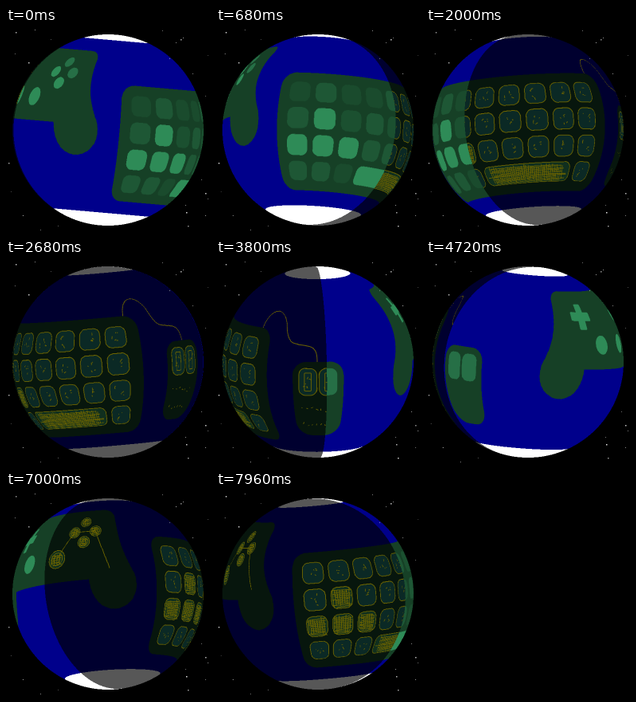
These frames come from a looping animation (256 px wide and 256 px high, 8000 ms). An HTML page with a canvas:

```html
<!DOCTYPE html>
<html>
<head>
<meta charset="utf-8">
<style>
html, body { margin: 0; width: 100%; height: 100%; overflow: hidden; background: #000; }
canvas { display: block; width: 100vw; height: 100vh; }
</style>
</head>
<body>
<canvas id="stage" width="256" height="256"></canvas>
<script>
const SIZE = 256, RADIUS = 120, LOOP = 8000;
const SCALE = 4, MAP_W = 360 * SCALE, MAP_H = 180 * SCALE;
const DEG = Math.PI / 180;
const LAND = '#164026', BRIGHT = '#2e8b57', MEDIUM = '#266f46';
const GOLD = '#6e6500', NIGHT_KEY = '#0b2925';

let seed = 7;
const random = () => (seed = (seed * 16807) % 2147483647) / 2147483647;
const between = (a, b) => a + (b - a) * random();

// Map canvases use longitude (0..360) and latitude (90..-90) as coordinates.
function makeMap() {
  const canvas = document.createElement('canvas');
  canvas.width = MAP_W;
  canvas.height = MAP_H;
  const g = canvas.getContext('2d');
  g.setTransform(SCALE, 0, 0, -SCALE, 0, MAP_H / 2);
  return g;
}
const pixels = g => new Uint32Array(g.getImageData(0, 0, MAP_W, MAP_H).data.buffer);

function box(cx, cy, w, h, r) {
  const path = new Path2D();
  path.roundRect(cx - w / 2, cy - h / 2, w, h, r);
  return path;
}
function disc(cx, cy, r) {
  const path = new Path2D();
  path.arc(cx, cy, r, 0, 2 * Math.PI);
  return path;
}

const keys = [];
for (let row = 0; row < 4; row++) {
  for (let col = 0; col < 8; col++) {
    if (row === 3 && col > 2 && col < 7) continue;
    const lit = (row === 1 && col === 1) || (row === 2 && col < 3);
    const fill = lit ? BRIGHT : ['#1a4b2d', '#1b5030', '#1e5735'][Math.floor(random() * 3)];
    keys.push({ x: 20 + 16.4 * col, y: 16 - 16.4 * row, w: 13, h: 12.8, lit, fill });
  }
}
keys.push({ x: 93.3, y: -33.2, w: 62, h: 12.8, lit: true, fill: BRIGHT });

const mouseButtons = [
  { x: 176.2, y: -2.2, w: 11, h: 16.5, fill: MEDIUM },
  { x: 188.6, y: -2.2, w: 11, h: 16.5, fill: MEDIUM }
];
const allKeys = [...keys, ...mouseButtons];

const padButtons = [
  [279, 16.7, 5.8, BRIGHT], [303.5, 16.7, 5.8, BRIGHT],
  [314, 34.3, 4, BRIGHT], [321.6, 26.6, 4, BRIGHT],
  [329.6, 34.3, 4, MEDIUM], [321.6, 42.4, 4, MEDIUM]
];

const keyboard = box(78.5, -9, 143, 76, 9);
const mouse = new Path2D();
mouse.roundRect(167, -40, 31, 50, [11, 11, 8, 8]);

const gamepad = new Path2D(
  'M252 54 H336 Q344 54 345.5 47 Q344.5 30 347 20 Q349 12 353 4 ' +
  'Q356 -8 348 -14 Q340 -19.5 332 -14 Q326 -9 325 2 H263 ' +
  'Q262 -9 256 -14 Q248 -19.5 240 -14 Q232 -8 235 4 ' +
  'Q239 12 241 20 Q243.5 30 242.5 47 Q244 54 252 54 Z');

const cross = new Path2D();
cross.roundRect(256.6, 31.9, 17, 6, 1);
cross.roundRect(262.1, 26.1, 6, 17.6, 1);

const cable = new Path2D('M141.7 29 C142 43 155 45 160 33 C163 20 166 21 173 20 S182 18 182 10');
const circuit = new Path2D('M303.5 16.7 L314 34.3 H329.6 L338 8');

function drawDay(g) {
  const fill = (path, color) => { g.fillStyle = color; g.fill(path); };
  g.fillStyle = '#00008b';
  g.fillRect(0, -90, 360, 180);
  g.fillStyle = '#fff';
  g.fillRect(0, 70, 360, 20);
  g.fillRect(0, -90, 360, 30);
  for (const shape of [keyboard, mouse, gamepad]) fill(shape, LAND);
  for (const k of allKeys) fill(box(k.x, k.y, k.w, k.h, 4), k.fill);
  for (const [x, y, r, color] of padButtons) fill(disc(x, y, r), color);
  fill(cross, BRIGHT);
}

function line(g, x1, y1, x2, y2) {
  g.beginPath();
  g.moveTo(x1, y1);
  g.lineTo(x2, y2);
  g.stroke();
}

function dash(g, x, y) {
  const angle = between(-1.5, 1.5), length = between(0.5, 1.8);
  line(g, x, y, x + length * Math.cos(angle), y + length * Math.sin(angle));
}

// Ragged crosshatching inside a box.
function scribble(g, cx, cy, w, h, gap) {
  const reach = size => size * between(0.28, 0.48);
  for (let y = -h * 0.42; y <= h * 0.42; y += gap) {
    const tilt = between(-0.4, 0.4);
    line(g, cx - reach(w), cy + y - tilt, cx + reach(w), cy + y + tilt);
  }
  for (let x = -w * 0.42; x <= w * 0.42; x += gap * 1.3) {
    const tilt = between(-0.4, 0.4);
    line(g, cx + x - tilt, cy - reach(h), cx + x + tilt, cy + reach(h));
  }
}

function drawNight(g) {
  g.save();
  g.resetTransform();
  g.drawImage(dayMap.canvas, 0, 0);
  g.fillStyle = 'rgba(0,0,0,0.66)';
  g.fillRect(0, 0, MAP_W, MAP_H);
  g.restore();
  g.strokeStyle = GOLD;
  g.fillStyle = NIGHT_KEY;
  g.lineWidth = 0.45;
  for (const path of [cable, circuit, cross]) g.stroke(path);

  for (const k of allKeys) {
    const shape = box(k.x, k.y, k.w, k.h, 4);
    if (!k.lit) g.fill(shape);
    g.stroke(shape);
    if (k.lit) scribble(g, k.x, k.y, k.w, k.h, 1.1);
    else for (let i = 0; i < 5; i++) dash(g, k.x + between(-3.5, 2.2), k.y + between(-3, 3));
  }
  for (const k of mouseButtons) g.stroke(box(k.x, k.y, 4, 11, 0.5));

  for (const [x, y, r] of padButtons) {
    for (const k of [1, 0.7, 0.4]) g.stroke(disc(x, y, r * k));
    scribble(g, x, y, r * 1.5, r * 1.5, 1.5);
  }
  for (const y of [-20, -32])
    for (let i = 0; i < 7; i++) dash(g, 172 + i * 3, y + between(-1.5, 1.5));
}

const dayMap = makeMap(), nightMap = makeMap();
drawDay(dayMap);
drawNight(nightMap);
const day = pixels(dayMap), night = pixels(nightMap);

const stage = document.getElementById('stage').getContext('2d');
const image = stage.createImageData(SIZE, SIZE);
const out = new Uint32Array(image.data.buffer).fill(0xff000000);

// Four samples per pixel: points of the unit sphere facing the viewer.
const globe = [];
for (let py = 0; py < SIZE; py++) {
  for (let px = 0; px < SIZE; px++) {
    const points = [];
    for (const dy of [0.25, 0.75]) for (const dx of [0.25, 0.75]) {
      const x = (px + dx - 128) / RADIUS, y = (128 - py - dy) / RADIUS;
      const rest = 1 - x * x - y * y;
      if (rest > 0) points.push(x, y, Math.sqrt(rest));
    }
    if (points.length) globe.push({ at: py * SIZE + px, points });
  }
}

// x, y, brightness
const stars = [
  [12, 5, .8], [36, 2, .6], [11, 32, .6], [28, 43, .8], [56, 14, .4],
  [3, 169, .8], [21, 235, .7], [43, 253, .6], [65, 248, .4], [6, 205, .3],
  [196, 3, .6], [205, 38, .5], [213, 18, .7], [219, 14, .8], [222, 12, .6],
  [234, 57, .7], [250, 85, .4], [253, 34, .3], [245, 190, .6], [250, 207, .8],
  [253, 214, .6], [225, 222, .6], [226, 231, .9], [228, 248, .8], [250, 235, .6]
];

function drawGlobe(t) {
  const wobble = 2 * Math.PI * t / 5140;
  const roll = 5 * DEG * Math.cos(wobble), tilt = -10 * DEG * Math.sin(wobble);
  const cr = Math.cos(roll), sr = Math.sin(roll);
  const ct = Math.cos(tilt), st = Math.sin(tilt);
  const spin = 360 * t / 7500;
  const dusk = 103 - 360 * t / 5000;

  for (const { at, points } of globe) {
    let red = 0, green = 0, blue = 0;
    for (let i = 0; i < points.length; i += 3) {
      const x = points[i] * cr - points[i + 1] * sr;
      const y = points[i + 1] * cr + points[i] * sr;
      const z = points[i + 2];
      const lat = Math.asin(Math.max(-1, Math.min(1, y * ct + z * st))) / DEG;
      const lon = Math.atan2(x, z * ct - y * st) / DEG;
      const dark = (lon - dusk + 1080) % 360 < 176;
      const u = Math.floor((lon + spin + 360) % 360 * SCALE);
      const v = Math.min(MAP_H - 1, Math.floor((90 - lat) * SCALE));
      const color = (dark ? night : day)[v * MAP_W + u];
      red += color & 255;
      green += color >> 8 & 255;
      blue += color >> 16 & 255;
    }
    out[at] = 0xff000000 | blue >> 2 << 16 | green >> 2 << 8 | red >> 2;
  }
  stage.putImageData(image, 0, 0);
}

function drawStars(t) {
  stars.forEach(([x, y, light], i) => {
    const twinkle = 0.85 + 0.15 * Math.sin(t / 400 + i * 2.4);
    const size = light > 0.7 ? 1.5 : 1;
    stage.fillStyle = `rgba(255,255,255,${light * twinkle})`;
    stage.fillRect(x, y, size, size);
  });
}

function frame() {
  const t = performance.now() % LOOP;
  drawGlobe(t);
  drawStars(t);
  requestAnimationFrame(frame);
}
frame();
</script>
</body>
</html>
```
